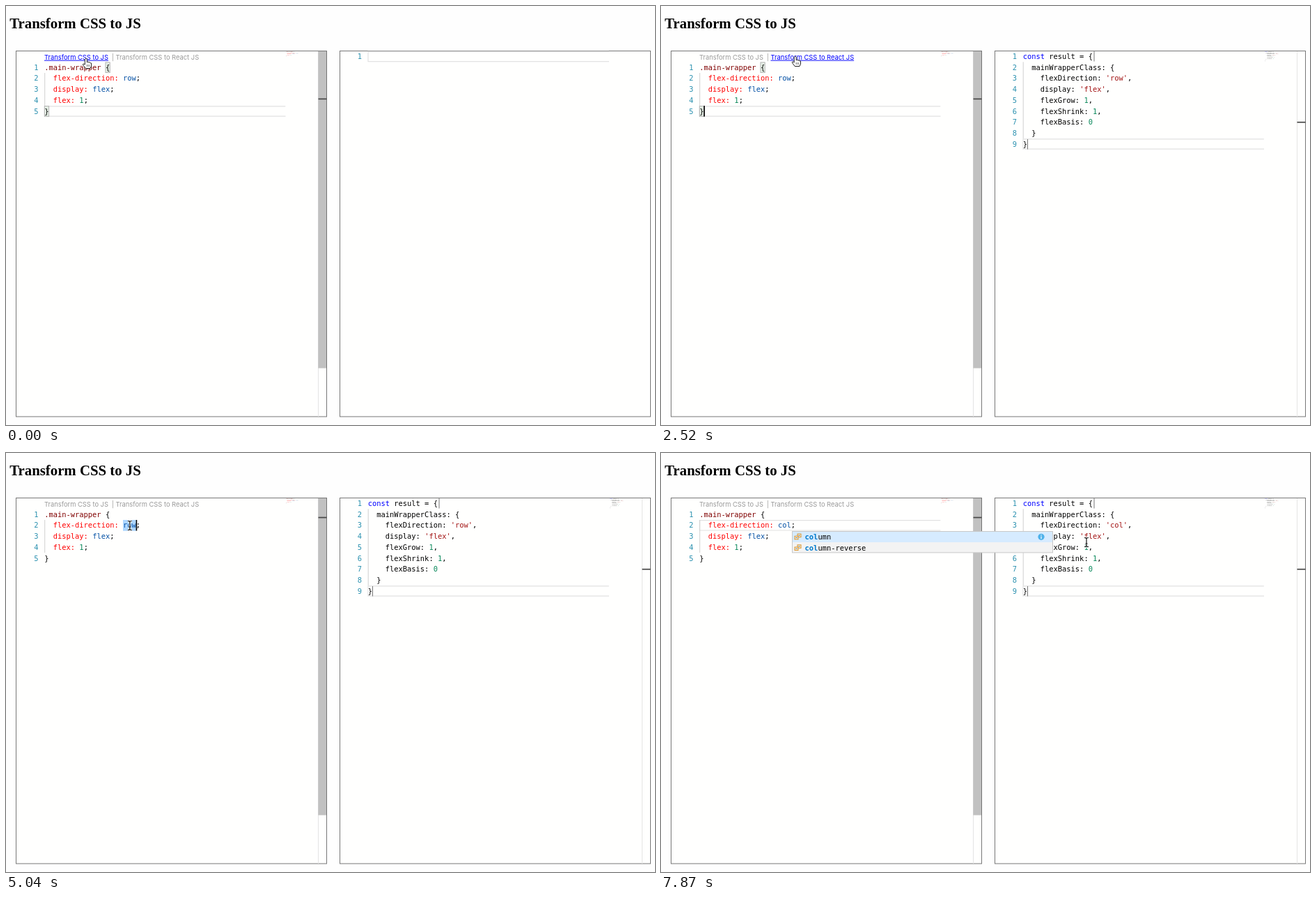
These frames come from a looping animation (932 by 601 pixels, 8 s). An HTML page:

```html
<!DOCTYPE html>
<html lang="en">
<head>
<meta charset="utf-8">
<title>Transform CSS to JS</title>
<style>
  html, body { margin: 0; width: 100%; height: 100%; overflow: hidden; background: #fefefe; }
  svg { display: block; }
  .title { font: bold 20.8px "Liberation Serif", serif; }
  .code { font: 10.4px "DejaVu Sans Mono", monospace; }
  .num { fill: #2b91af; text-anchor: end; }
  .lens { font: 9.36px Inter, sans-serif; fill: #999; }
  .lens .on { fill: #00f; text-decoration: underline; }
  .match { fill: #007acc; font-weight: bold; }
</style>
</head>
<body>
<svg id="stage" width="932" height="601" viewBox="0 0 932 601"></svg>
<script>
const LOOP = 8000, CHAR = 6.261, LINE = 15.7;
const LEFT = { x: 55.3, top: 80.3, pane: 14.5 };
const RIGHT = { x: 519.8, top: 64.6, pane: 479.5 };

// Value of the last [time, value] step that has been reached.
const at = (t, steps) => steps.filter(s => s[0] <= t).pop()[1];

const rect = (x, y, w, h, fill, extra = '') =>
  `<rect x="${x}" y="${y}" width="${w}" height="${h}" fill="${fill}" ${extra}/>`;
const path = (d, stroke, width = 1, fill = 'none') =>
  `<path d="${d}" stroke="${stroke}" stroke-width="${width}" fill="${fill}"/>`;

const CSS_RULES = [/(\.[\w-]+)|([\w-]+:)|(\b\d+)|(\w+)/g, ['#800000', '#f00', '#09885a', '#0451a5']];
const JS_RULES = [/(const)|(\/\/.*)|("\w+"|'\w+')|(\b\d+)/g, ['#00f', '#008000', '#a31515', '#09885a']];

const cssCode = value => ['.main-wrapper {', `  flex-direction: ${value};`, '  display: flex;', '  flex: 1;', '}'];
const plainJs = ['const result = {', '', '  // .main-wrapper', '  mainWrapperClass: {',
  '      flexDirection: "row",', '      display: "flex",', '      flex: "1"', '  }', '}'];
const reactJs = value => ['const result = {', '  mainWrapperClass: {', `    flexDirection: '${value}',`,
  "    display: 'flex',", '    flexGrow: 1,', '    flexShrink: 1,', '    flexBasis: 0', '  }', '}'];

const paint = (line, [rules, colours]) => line.replace(/ /g, '\u00a0').replace(rules, (word, ...groups) =>
  `<tspan fill="${colours[groups.findIndex(Boolean)]}">${word}</tspan>`);

const textLines = (lines, rules, x, top) => lines.map((line, i) =>
  `<text class="code" x="${x}" y="${top + 11.4 + i * LINE}">${paint(line, rules)}</text>`).join('');

const bracket = (ed, line, col) => rect(ed.x + col * CHAR, ed.top + line * LINE + .6, CHAR, 14.6,
  '#e6f0e6', 'stroke="#b4b4b4"');

function editor(ed, lines, rules, current) {
  const { x, top, pane } = ed, y = top + current * LINE + .7;
  let out = rect(pane, 64.5, 446, 524.5, '#fffffe', 'stroke="#777"');
  if (current >= 0) out += path(`M${x + 346} ${y}H${x + .2}v14.3h346`, '#e2e2e2', 1.2);
  if (lines.length > 1)
    out += path(`M${x + .4} ${top + LINE}V${top + (lines.length - 1) * LINE}`, '#d0d0d0');
  lines.forEach((_, i) => {
    out += `<text class="code num" x="${x - 8.8}" y="${top + 11.4 + i * LINE}">${i + 1}</text>`;
  });
  return out;
}

const minimap = (ed, lines, rules) =>
  `<g transform="translate(${ed.pane + 387.5} 65) scale(.13 .1)" font-weight="bold">${textLines(lines, rules, 0, 0)}</g>`;

function ruler(ed, thumbHeight, opacity, markY) {
  const x = ed.pane + 434;
  return path(`M${x} 65V589`, '#e4e4e4') +
    rect(x, 65, 12, thumbHeight, '#646464', `fill-opacity="${.4 * opacity}"`) +
    rect(x, markY - .8, 12, 1.7, '#484848');
}

function lens(active) {
  const link = (x, name, id) =>
    `<text class="lens"><tspan class="${active === id ? 'on' : ''}" x="${x}" y="76.7">${name}</tspan></text>`;
  return link(55, 'Transform CSS to JS', 1) + '<text class="lens" x="151.8" y="76.7">|</text>' +
    link(157.5, 'Transform CSS to React JS', 2);
}

function popup(x, typed) {
  const words = ['column', 'column-reverse', 'inherit', 'initial', 'row', 'row-reverse', 'unset']
    .filter(w => w.startsWith(typed));
  let out = rect(x + .5, 112.5, 374, words.length * 15.6 - .8, '#f3f3f3', 'stroke="#c8c8c8"') +
    rect(x + 1, 113, 373, 15, '#d6ebff');
  words.forEach((word, i) => {
    const y = 112.3 + i * LINE;
    out += rect(x + 8, y + 3.8, 5, 4.5, '#fff3dd', 'stroke="#d8932c"') +
      rect(x + 4, y + 7, 5, 4.5, '#fff3dd', 'stroke="#d8932c"') +
      path(`M${x + 5.3} ${y + 9.2}h2.5M${x + 9.3} ${y + 6}h2.5`, '#4a7ba6') +
      `<text class="code" x="${x + 18.6}" y="${y + 11.6}"><tspan class="match">${typed}</tspan>${word.slice(typed.length)}</text>`;
  });
  return out + `<circle cx="${x + 358}" cy="120.3" r="4.6" fill="#4fb2ea"/>` +
    path(`M${x + 358} 117.3v1.3m0 .9v3.7`, '#fff', 1.2);
}

function pointer([x, y, hand]) {
  const shape = hand
    ? path('M-1.5 1.3Q0-1 1.5 1.3V5.8Q3 4.5 4.2 6Q5.5 5.2 6.4 6.7Q7.8 6.2 7.8 8V11L6.3 14.5H-.5L-4.4 9.2Q-4.6 7-1.5 9Z', '#222', 1, '#fff') +
      path('M1.4 9v3m1.8-3v3m1.8-3v3', '#555', .7)
    : ['#fff', '#111'].map((c, i) =>
      path('M-3-6.5Q0-6.5 0-5Q0-6.5 3-6.5M0-5V5M-3 6.5Q0 6.5 0 5Q0 6.5 3 6.5M-1.5 2h3', c, i ? 1.2 : 2.8)).join('');
  return `<g transform="translate(${x} ${y})">${shape}</g>`;
}

const MOUSE = [[0, [114.8, 75, 1]], [1180, [122, 75, 1]], [1330, [140, 74, 1]], [1480, [165, 73, 1]],
  [1620, [187, 72, 1]], [1770, [192.7, 72, 1]], [3410, [194, 86]], [3560, [188, 99]], [3710, [180, 113]],
  [3860, [172, 118]], [4160, [173, 115]], [4300, [175, 110]], [4450, [177, 105]], [4590, [177.8, 104]],
  [7720, [400, 115]], [7870, [611, 128]]];
const LINK = [[0, 1], [1480, 2], [3410, 0]];
const VALUE = [[0, 'row'], [5640, ''], [6680, 'c'], [7130, 'co'], [7280, 'col']];
// Caret as [line, column], or null while blinked off.
const END = [4, 1];
const CARET = [[0, null], [150, END], [740, null], [1180, END], [1770, null], [2220, END], [2670, null],
  [3120, END], [3560, null], [4160, END], [4590, null], [4890, [1, 19]], [5040, [1, 21]], [5340, null],
  [5640, [1, 18]], [6230, null], [6680, [1, 19]], [7130, [1, 20]], [7280, [1, 21]], [7720, null]];
const THUMB = [[0, 1], [740, .9], [890, .71], [1180, .36], [1330, .17], [1480, 0]];
const OUTPUT = [[0, ['']], [150, plainJs], [2520, reactJs('row')], [7280, reactJs('col')]];

function scene(t) {
  const value = at(t, VALUE), css = cssCode(value), js = at(t, OUTPUT), caret = at(t, CARET);
  const clicked = t >= 4890, selected = t >= 5040 && t < 5640, error = t >= 6830 && t < 7130;
  let out = '<text class="title" x="5.2" y="32.3">Transform CSS to JS</text>';

  out += editor(LEFT, css, CSS_RULES, clicked ? (selected ? -1 : 1) : 4);
  if (!clicked) out += bracket(LEFT, 0, 14) + bracket(LEFT, 4, 0);
  if (selected) out += rect(LEFT.x + 18 * CHAR, LEFT.top + LINE, 3 * CHAR, LINE, '#add6ff');
  out += lens(at(t, LINK)) + textLines(css, CSS_RULES, LEFT.x, LEFT.top) + minimap(LEFT, css, CSS_RULES);
  out += ruler(LEFT, 454.5, 1, clicked ? 92.5 : 133.3);
  if (selected && t >= 5340) out += rect(450, 93, 4, 12, '#a0a0a0');
  if (error) out += rect(454, 93.3, 6.3, 12, '#d04545') + path('M175 110.5l1.5-1.5 1.5 1.5 1.5-1.5 1.5 1.5', '#e33');

  out += editor(RIGHT, js, JS_RULES, js.length - 1);
  if (js === plainJs) out += bracket(RIGHT, 0, 15) + bracket(RIGHT, 8, 0);
  else if (js.length > 1) out += path('M622 65v14.5M526.5 191v14.5', '#777');
  out += textLines(js, JS_RULES, RIGHT.x, RIGHT.top) + minimap(RIGHT, js, JS_RULES);
  if (js.length > 1) out += ruler(RIGHT, 422, at(t, THUMB), 166.7);

  if (caret) out += rect(LEFT.x + caret[1] * CHAR - .2, LEFT.top + caret[0] * LINE, 1.6, 15.5, '#000');
  if (t >= 6230) out += popup(169 + Math.round(value.length * 6.3), value);
  return out + pointer(at(t, MOUSE));
}

const stage = document.getElementById('stage');
let shown = '';
function tick() {
  const next = scene(performance.now() % LOOP);
  if (next !== shown) stage.innerHTML = shown = next;
  requestAnimationFrame(tick);
}
tick();
</script>
</body>
</html>
```
